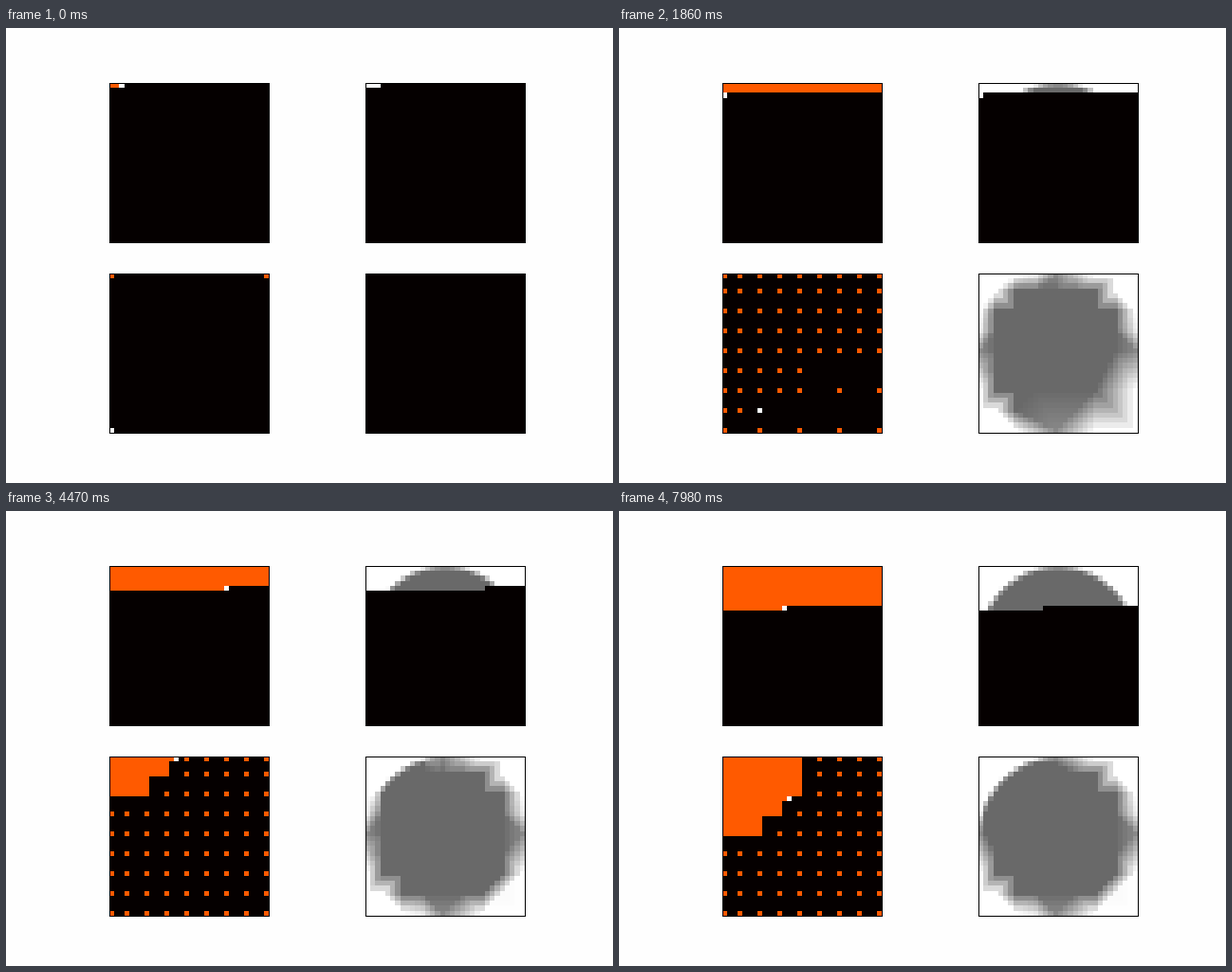
Animation, 640 px wide and 480 px high, one loop 8 s. Source, as an HTML page with a canvas:

```html
<!DOCTYPE html>
<html lang="en">
<head>
<meta charset="utf-8">
<title>Raster scan and quadtree sampling</title>
<style>
  html, body { margin: 0; width: 100%; height: 100%; overflow: hidden; background: #fefefe; }
  canvas { display: block; }
</style>
</head>
<body>
<canvas id="stage" width="640" height="480"></canvas>
<script>
const N = 32, CELL = 5.25;
const STEP_MS = 30, LOOP_MS = 8000, FIRST = 3;
const STEPS = Math.ceil(LOOP_MS / STEP_MS);
const EMPTY = '#050000', VISITED = '#ff5a00', CURRENT = '#fff';
const ctx = document.getElementById('stage').getContext('2d');

// The sampled picture: a plain grey disc on white.
function shade({ x, y }) {
  const cover = Math.min(1, Math.max(0, 16.3 - Math.hypot(x - 15.5, y - 15.5)));
  return 255 - 150 * cover;
}

const makePoint = (x, y) => ({ x, y, v: shade({ x, y }) });

function scanOrder() {
  return Array.from({ length: N * N }, (_, i) => makePoint(i % N, Math.floor(i / N)));
}

// Breadth-first quadtree; the smallest cells are filled row by row.
function treeOrder() {
  const seen = new Set(), points = [];
  const add = (x, y) => {
    const key = y * N + x;
    if (seen.has(key)) return;
    seen.add(key);
    points.push(makePoint(x, y));
  };
  const last = N - 1;
  add(0, 0); add(last, 0); add(0, last); add(last, last);
  const queue = [[0, 0, last, last]];
  for (const [x0, y0, x1, y1] of queue) {
    if (x1 - x0 <= 4) {
      for (let y = y0; y <= y1; y++)
        for (let x = x0; x <= x1; x++) add(x, y);
      continue;
    }
    const mx = (x0 + x1) >> 1, my = (y0 + y1) >> 1;
    add(mx, y0); add(x0, my); add(mx, my); add(x1, my); add(mx, y1);
    queue.push([x0, y0, mx, my], [mx, y0, x1, my], [x0, my, mx, y1], [mx, my, x1, y1]);
  }
  return points;
}

const cross = (a, b, c) => (b.x - a.x) * (c.y - a.y) - (b.y - a.y) * (c.x - a.x);

function inCircle([a, b, c], p) {
  const [A, B, C] = [a, b, c].map(q => {
    const x = q.x - p.x, y = q.y - p.y;
    return { x, y, s: x * x + y * y };
  });
  return A.s * (B.x * C.y - C.x * B.y)
       - B.s * (A.x * C.y - C.x * A.y)
       + C.s * (A.x * B.y - B.x * A.y) > 0;
}

// Adds one point to a Delaunay mesh.
function insert(mesh, p) {
  const hit = mesh.filter(t => inCircle(t, p));
  const kept = mesh.filter(t => !hit.includes(t));
  const edges = hit.flatMap(([a, b, c]) => [[a, b], [b, c], [c, a]]);
  for (const [a, b] of edges) {
    const shared = edges.some(([c, d]) => c === b && d === a);
    if (!shared && cross(a, b, p) > 0) kept.push([a, b, p]);
  }
  return kept;
}

function interpolate(mesh) {
  const out = new Uint8Array(N * N);
  for (const [a, b, c] of mesh) {
    const area = cross(a, b, c);
    const xs = [a.x, b.x, c.x], ys = [a.y, b.y, c.y];
    for (let y = Math.min(...ys); y <= Math.max(...ys); y++) {
      for (let x = Math.min(...xs); x <= Math.max(...xs); x++) {
        const q = { x, y };
        const u = cross(b, c, q), v = cross(c, a, q), w = cross(a, b, q);
        if (u >= 0 && v >= 0 && w >= 0)
          out[y * N + x] = Math.round((u * a.v + v * b.v + w * c.v) / area);
      }
    }
  }
  return out;
}

const scan = scanOrder(), tree = treeOrder();

function buildEstimates() {
  const [tl, tr, bl, br] = tree;
  let mesh = [[tl, tr, br], [tl, br, bl]];
  const list = [null];
  for (let step = 1; step < STEPS; step++) {
    if (step > 1) mesh = insert(mesh, tree[step + FIRST - 1]);
    list.push(interpolate(mesh));
  }
  return list;
}
const estimates = buildEstimates();

const grey = v => `rgb(${v},${v},${v})`;

function panel(left, top, paint) {
  const edge = (origin, i) => Math.round(origin + i * CELL);
  const x0 = left - 0.02, y0 = top;
  const frameX = Math.round(left), frameY = Math.round(top);
  ctx.fillStyle = EMPTY;
  ctx.fillRect(frameX, frameY, 169, 169);
  paint((x, y, color) => {
    const px = edge(x0, x), py = edge(y0, y);
    ctx.fillStyle = color;
    ctx.fillRect(px, py, edge(x0, x + 1) - px, edge(y0, y + 1) - py);
  });
  ctx.strokeStyle = '#000';
  ctx.strokeRect(frameX + 0.5, frameY + 0.5, 168, 168);
}

function drawVisits(points, count) {
  return cell => {
    for (let i = 0; i < count; i++)
      cell(points[i].x, points[i].y, i === count - 1 ? CURRENT : VISITED);
  };
}

function draw(step) {
  const count = step + FIRST;
  ctx.fillStyle = '#fefefe';
  ctx.fillRect(0, 0, 640, 480);
  panel(109, 57.87, drawVisits(scan, count));
  panel(379, 57.87, cell => {
    for (const p of scan.slice(0, count)) cell(p.x, p.y, grey(Math.round(p.v)));
  });
  panel(109, 258.9, drawVisits(tree, count));
  panel(379, 258.9, cell => {
    if (estimates[step])
      estimates[step].forEach((v, i) => cell(i % N, Math.floor(i / N), grey(v)));
  });
}

let start = null, shown = -1;
function tick(now) {
  if (start === null) start = now;
  const step = Math.floor(((now - start) % LOOP_MS) / STEP_MS);
  if (step !== shown) draw(shown = step);
  requestAnimationFrame(tick);
}
draw(0);
requestAnimationFrame(tick);
</script>
</body>
</html>
```
